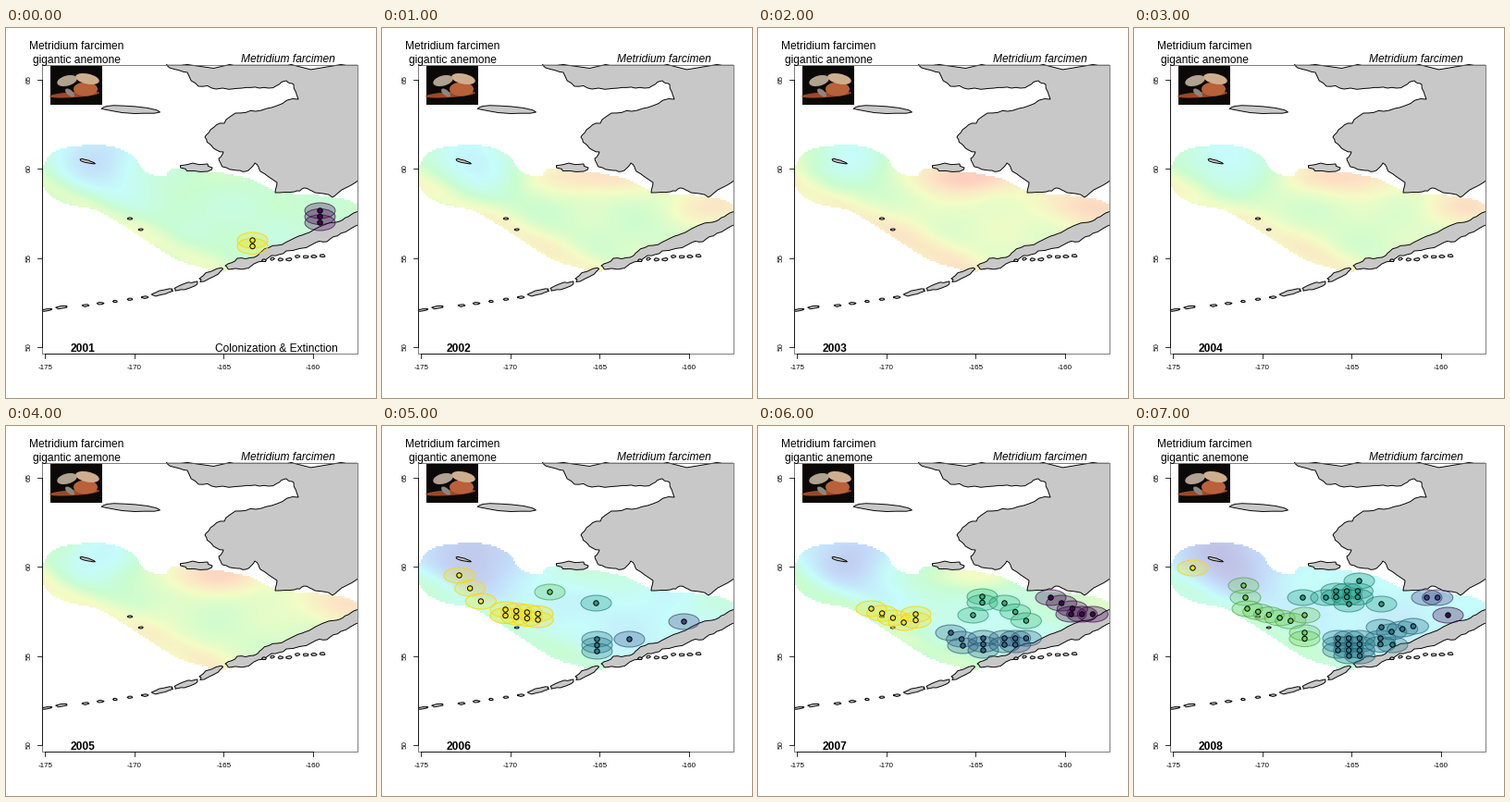
Write a matplotlib script that moves like this. It is 400 by 400 pixels and loops after 8000 ms.

```python
import matplotlib.pyplot as plt
import numpy as np
from matplotlib.animation import ArtistAnimation
from matplotlib.collections import EllipseCollection
from matplotlib.colors import LinearSegmentedColormap
from matplotlib.patches import Ellipse, Polygon, Rectangle
from matplotlib.path import Path

SIZE, DPI = 400, 100
PX = 72 / DPI
LEFT, TOP, RIGHT, BOTTOM = 39, 39, 380, 351
DEGREE = 19.3
CELL = 2
STATION_DX, STATION_DY = 11.7, 6.5

rng = np.random.default_rng(4)
fig = plt.figure(figsize=(SIZE / DPI, SIZE / DPI), dpi=DPI, facecolor="white")
ax = fig.add_axes([0, 0, 1, 1])
ax.set_xlim(0, SIZE)
ax.set_ylim(SIZE, 0)
ax.axis("off")
plot_box = Rectangle((LEFT, TOP), RIGHT - LEFT, BOTTOM - TOP,
                     transform=ax.transData)

# Key points of the coast; roughen() adds the small coves
MAINLAND = [
    (171, 36), (180, 44), (196, 48), (208, 63), (227, 66), (255, 65),
    (274, 65), (293, 62), (303, 57), (311, 61), (316, 77), (293, 84),
    (270, 90), (248, 92), (236, 103), (221, 110), (215, 118), (222, 127),
    (235, 134), (230, 141), (234, 150), (250, 154), (262, 154), (269, 146),
    (275, 155), (293, 167), (291, 178), (312, 177), (322, 173), (334, 178),
    (353, 183), (363, 175), (383, 163), (383, 36)]
PENINSULA = [
    (383, 197), (370, 204), (357, 210), (328, 221), (312, 227), (293, 235),
    (276, 242), (268, 248), (250, 249), (237, 257), (241, 261), (268, 255),
    (287, 246), (303, 241), (331, 234), (347, 231), (362, 222), (383, 212)]
SURVEY = [
    (38, 166), (40, 146), (52, 132), (75, 127), (112, 126), (140, 138),
    (147, 155), (172, 163), (176, 152), (190, 152), (262, 160), (290, 178),
    (345, 181), (382, 188), (382, 206), (300, 240), (239, 265), (222, 262),
    (185, 252), (145, 225), (110, 203), (95, 195), (62, 191), (44, 178)]
# Centre, width, height, tilt
ISLANDS = [(133, 88, 60, 8, 5), (206, 151, 34, 9, 0), (221, 267, 28, 8, -26),
           (195, 279, 26, 6, -17), (169, 286, 24, 5, -14), (87, 144, 17, 3, 16),
           (60, 302, 12, 3, -8), (43, 305, 16, 2, -8), (134, 206, 5, 2, 0),
           (146, 218, 5, 2, 0)]

# Per year: overall chill, warmth along the shore
CLIMATE = {2001: (0.5, 0.2), 2002: (0.1, 1.0), 2003: (-0.2, 1.1),
           2004: (0.0, 1.0), 2005: (0.0, 1.0), 2006: (1.2, 0.4),
           2007: (0.9, 0.9), 2008: (1.3, 0.2)}

# Patches of survey stations: colour level, x, y, columns, rows, lean
SIGHTINGS = {
    2001: [(0.98, 266, 229, 1, 2), (0, 339, 197, 1, 3)],
    2006: [(0.98, 83, 161, 3, 1, 14), (0.98, 133, 198, 4, 2, 1.5),
           (0.75, 180, 178), (0.55, 230, 190), (0.42, 232, 230, 1, 3),
           (0.3, 266, 229), (0.2, 325, 210)],
    2007: [(0.98, 122, 197, 4, 1, 5), (0.98, 170, 203, 1, 2),
           (0.65, 242, 184, 1, 2), (0.65, 231, 203),
           (0.65, 266, 191, 3, 1, 9.5), (0.33, 208, 223, 2, 1, 7),
           (0.33, 220, 236), (0.33, 243, 229, 1, 3), (0.33, 266, 229, 3),
           (0.33, 266, 236, 2), (0, 316, 185, 3, 1, 6), (0, 338, 203, 3)],
    2008: [(0.98, 62, 152), (0.78, 117, 171), (0.78, 119, 184),
           (0.78, 122, 197, 5, 1, 3.3), (0.78, 183, 203),
           (0.78, 184, 223, 1, 2), (0.57, 181, 184), (0.57, 206, 184),
           (0.57, 218, 178, 3, 2), (0.57, 231, 191), (0.57, 242, 166),
           (0.57, 266, 191), (0.42, 220, 229, 3, 3), (0.42, 232, 248, 2),
           (0.42, 266, 229, 1, 2), (0.42, 266, 216), (0.42, 278, 235),
           (0.42, 278, 222, 3, 1, -3), (0.2, 316, 185, 2), (0, 338, 203)],
}

PASTEL = LinearSegmentedColormap.from_list("pastel", [
    "#bfbbdf", "#c4dbfa", "#c6fcfa", "#c9fcd0", "#f4fcc5", "#fde3c5",
    "#fcc8be"])
VIRIDIS = plt.get_cmap("viridis")


def roughen(points, depth=2, amount=0.13):
    pts = np.array(points, float)
    for _ in range(depth):
        step = np.roll(pts, -1, axis=0) - pts
        normal = np.column_stack([-step[:, 1], step[:, 0]])
        push = rng.uniform(-amount, amount, (len(pts), 1))
        middle = pts + step / 2 + normal * push
        pts = np.stack([pts, middle], axis=1).reshape(-1, 2)
    return pts


def round_corners(points, times=2):
    pts = np.array(points, float)
    for _ in range(times):
        after = np.roll(pts, -1, axis=0)
        pts = np.stack([0.75 * pts + 0.25 * after,
                        0.25 * pts + 0.75 * after], axis=1).reshape(-1, 2)
    return pts


def island(x, y, w, h, tilt=0):
    a = np.linspace(0, 2 * np.pi, 14, endpoint=False)
    r = rng.uniform(0.75, 1.15, len(a))
    u, v, t = r * w / 2 * np.cos(a), r * h / 2 * np.sin(a), np.radians(tilt)
    return np.column_stack([x + u * np.cos(t) - v * np.sin(t),
                            y + u * np.sin(t) + v * np.cos(t)])


def draw_land():
    shapes = [roughen(MAINLAND), roughen(PENINSULA)]
    shapes += [island(*spec) for spec in ISLANDS]
    for x in np.linspace(86, 150, 5):
        shapes.append(island(x, 300 - 0.14 * (x - 86), rng.uniform(4, 8), 2.5))
    for x in np.linspace(279, 342, 8):
        y = 252 - 0.1 * (x - 279) + rng.uniform(-2, 2)
        shapes.append(island(x, y, rng.uniform(4, 7), 3))
    for pts in shapes:
        shape = Polygon(pts, fc="#c8c8c8", ec="black", lw=0.95 * PX,
                        joinstyle="round", zorder=2)
        ax.add_patch(shape)
        shape.set_clip_path(plot_box)


def text(x, y, s, size=12, **kw):
    style = dict(ha="center", va="baseline", zorder=6) | kw
    return ax.text(x, y, s, fontsize=size * PX, family="Liberation Sans",
                   **style)


def line(xs, ys, color="black"):
    ax.plot(xs, np.add(ys, 0.6), color=color, lw=0.8 * PX, zorder=5,
            solid_capstyle="projecting")


def draw_axes():
    line([LEFT, RIGHT, RIGHT, LEFT, LEFT], [TOP, TOP, BOTTOM, BOTTOM, TOP],
         "#606060")
    ticks = np.arange(4) * 5 * DEGREE
    line([42, 42 + ticks[-1]], [BOTTOM, BOTTOM])
    line([LEFT, LEFT], [55, 55 + ticks[-1]])
    for i, t in enumerate(ticks):
        line([42 + t] * 2, [BOTTOM, BOTTOM + 5])
        text(42.5 + t, 369, str(5 * i - 175), 8)
        line([LEFT - 5, LEFT], [55 + t] * 2)
        text(25, 55.5 + t, str(65 - 5 * i), 8, rotation=90, va="center")


def draw_photo():
    frame = dict(xy=(48, 41), width=56, height=42)
    ax.add_patch(Rectangle(**frame, fc="#0b0908", lw=0, zorder=5))
    blobs = [(74, 72, 54, 6, -4, "#9a4a28"), (86, 66, 26, 15, 0, "#b8613a"),
             (66, 57, 22, 11, -15, "#b0a290"), (88, 55, 26, 11, 12, "#cfae8e"),
             (69, 70, 12, 6, 40, "#8d8780")]
    for x, y, w, h, angle, color in blobs:
        ax.add_patch(Ellipse((x, y), w, h, angle=angle, fc=color, lw=0,
                             zorder=5))


xs = np.arange(LEFT + 1, RIGHT, CELL) + CELL / 2
ys = np.arange(120, 268, CELL) + CELL / 2
gx, gy = np.meshgrid(xs, ys)
cells = np.column_stack([gx.ravel(), gy.ravel()])
inside = Path(round_corners(SURVEY)).contains_points(cells).reshape(gx.shape)


def bump(x, y, w, h):
    return np.exp(-((gx - x) / w) ** 2 - ((gy - y) / h) ** 2)


cold_pool = bump(100, 142, 50, 45)
shore = 1.9 * bump(230, 160, 65, 20) + 1.6 * bump(365, 192, 50, 22)
slope = 0.894 * (gy - 180) - 0.447 * (gx - 50)
shelf_edge = np.exp(-((slope + 6) / 16) ** 2)


def field(year):
    chill, shore_heat = CLIMATE[year]
    ripple = np.sin(gx / 17 + year) * np.sin(gy / 13 + 2 * year)
    warmth = (3.4 - 1.3 * chill - 1.5 * cold_pool + shore_heat * shore
              + 1.1 * shelf_edge + 0.2 * ripple)
    edges = (xs[0] - CELL / 2, xs[-1] + CELL / 2,
             ys[-1] + CELL / 2, ys[0] - CELL / 2)
    return ax.imshow(np.ma.array(warmth, mask=~inside), cmap=PASTEL, vmin=0,
                     vmax=6, extent=edges, interpolation="nearest",
                     aspect="auto", zorder=1)


def ovals(spots, w, h, zorder, **style):
    n = len(spots)
    group = EllipseCollection([w] * n, [h] * n, [0] * n, units="xy",
                              offsets=spots, offset_transform=ax.transData,
                              linewidths=PX, zorder=zorder, **style)
    return ax.add_collection(group, autolim=False)


def patch(level, x, y, cols=1, rows=1, lean=0):
    spots = [(x + 0.5 + STATION_DX * c, y + 0.5 + STATION_DY * r + lean * c)
             for r in range(rows) for c in range(cols)]
    rgb = VIRIDIS(float(level))[:3]
    rim = (0.98, 0.84, 0.08, 0.9) if level > 0.9 else (
        *(0.75 * c for c in rgb), 0.65)
    return [ovals(spots, 33, 17, 3, facecolors=[(*rgb, 0.3)],
                  edgecolors=[rim]),
            ovals(spots, 5.4, 5.4, 4, facecolors=[rgb], edgecolors="black")]


def scene(year):
    artists = [field(year), text(83.5, 350, str(year), weight="bold")]
    for spec in SIGHTINGS.get(year, []):
        artists += patch(*spec)
    if year == 2001:
        artists.append(text(292.5, 350, "Colonization & Extinction"))
    return artists


draw_land()
draw_axes()
draw_photo()
text(76, 23, "Metridium farcimen")
text(76, 38, "gigantic anemone")
text(305, 37, "Metridium farcimen", style="italic")

scenes = [scene(year) for year in CLIMATE]
ax.set_xlim(0, SIZE)
ax.set_ylim(SIZE, 0)
anim = ArtistAnimation(fig, scenes, interval=1000, repeat=True, repeat_delay=0)
plt.show()
```
